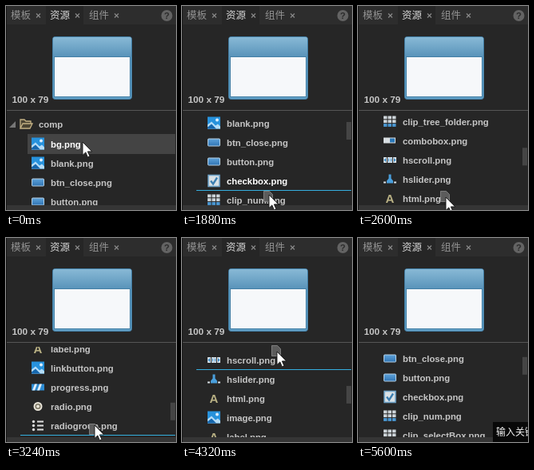
An HTML page for the animation above (5920 ms loop, 213 px wide and 255 px high).

```html
<!DOCTYPE html>
<html lang="zh-CN">
<head>
<meta charset="utf-8">
<style>
  html, body { margin: 0; width: 100%; height: 100%; overflow: hidden; background: #262626; }
  svg { display: block; width: 100vw; height: 100vh; }
  text { font: bold 11.35px "Liberation Sans", Arial, sans-serif; fill: #c6c6c6; }
  .tab { font: 12.5px "Noto Sans CJK SC", "Noto Sans CJK", sans-serif; fill: #929292; }
  .on { fill: #d8d8d8; }
  .letter { font-size: 15px; fill: #b9b184; }
  .active text:last-child { fill: #fff; }
  .bar { fill: none; }
  .lit .bar { fill: #444; }
</style>
</head>
<body>
<svg viewBox="0 0 213 255">
  <defs>
    <linearGradient id="title" x2="0" y2="1">
      <stop stop-color="#88b9d6"/><stop offset="1" stop-color="#5a94ba"/>
    </linearGradient>
    <linearGradient id="glossy" x2="0" y2="1">
      <stop stop-color="#5fa3da"/><stop offset="1" stop-color="#2f74b4"/>
    </linearGradient>
    <clipPath id="listArea"><rect y="136" width="213" height="113"/></clipPath>
  </defs>

  <rect width="213" height="255" fill="#262626"/>
  <rect width="213" height="23" fill="#2d2d2d"/>
  <rect x="50" width="47" height="23" fill="#262626"/>
  <g id="tabs"></g>
  <circle cx="201.500" cy="12" r="7" fill="#636363"/>
  <text x="201.500" y="16" text-anchor="middle" style="fill:#2d2d2d">?</text>

  <rect x="58.5" y="38.5" width="99" height="78" rx="3" fill="#62a0c6" stroke="#437fa6"/>
  <path d="M59 63v-22q0-2 2-2h94q2 0 2 2v22z" fill="url(#title)"/>
  <rect x="60.5" y="63.5" width="95" height="50" fill="#f6f8fa" stroke="#437fa6"/>
  <text x="7.500" y="121" style="font-size:11.8px">100 x 79</text>
  <path d="M0 130.500h213" stroke="#555"/>

  <g clip-path="url(#listArea)">
    <g id="list">
      <path d="M12 144v8h-8z" fill="#777"/>
      <path d="M18 153v-11h5l2 2h6v3M18 153l3-6h12l-3 6z" fill="#4b4432" stroke="#c3b184" stroke-width="1.300"/>
      <text x="41" y="152">comp</text>
    </g>
    <path id="dropLine" d="M18 0h194" stroke="#35aede"/>
    <rect id="thumb" x="206" width="6" height="22" fill="#454545"/>
  </g>
  <rect y="249" width="213" height="6" fill="#353535"/>
  <path d="M.5 0v255" stroke="#151515"/>

  <path id="page" d="M.5.5h7l4 4v9h-11z" fill="#5c5c5c" stroke="#969696" stroke-opacity=".7"/>
  <path id="cursor" d="M0 0v16.500l3.800-3.600 2.600 6 2.600-1.100-2.600-5.900h5.300z" fill="#fff" stroke="#111" stroke-width=".9"/>
  <g id="hint">
    <rect x="169" y="230" width="44" height="25" fill="#080808"/>
    <text class="tab" x="173" y="247" style="fill:#f2f2f2;font-size:12px">输入关键字</text>
  </g>
</svg>
<script>
const LOOP = 5920, TICK = 40, PITCH = 24, FIRST_ROW = 172;
const DRAG_OVER = 350, DRAG_OVER_PHASE = 90;
const $ = id => document.getElementById(id);
const rect = (x, y, w, h, fill, extra = '') =>
  `<rect x="${x}" y="${y}" width="${w}" height="${h}" fill="${fill}" ${extra}/>`;

// Icons are drawn around their own centre.
const icons = {
  picture: rect(-8, -8, 16, 15, '#2792dc') +
    '<circle cx="4" cy="-4" r="2" fill="#dcefff"/><path d="M-8 7v-5l5-4 5 5 3-2 3 3v3z" fill="#b4dcf8"/><path d="M-8 7v-2l5-4 6 6z" fill="#1667ad"/>',
  button: rect(-7.5, -4.5, 15, 9, 'url(#glossy)', 'rx="1" stroke="#b4cfe2"'),
  checkbox: rect(-7, -7, 14, 14, '#d9e1e6', 'stroke="#6fa3c8" stroke-width="1.6"') +
    '<path d="M-4 0l3 4 5-8" fill="none" stroke="#3c7fb2" stroke-width="2.4"/>',
  clip: [0, 1, 2].map(r => [0, 1, 2].map(c =>
    rect(c * 5.5 - 8, r * 4.8 - 7, 4.5, 3.8, r == 2 ? '#4a97d2' : '#ccd3d8')).join('')).join(''),
  combo: rect(-8, -4, 15, 7, '#d8dee2') + rect(0, -3, 6, 5, '#2a78b8'),
  scroll: [[-8, 4], [-3, 6], [4, 4]].map(([x, w]) => rect(x, -3.5, w, 7, '#d8e2e9')).join('') +
    '<path d="M-5-2.500v5l-2.500-2.500zM5-2.500v5l2.500-2.500zM-2-2h1v4h-1zM1-2h1v4h-1z" fill="#2b7fbd"/>',
  slider: rect(-8, 3, 3, 2, '#d5dde3') + rect(5, 3, 3, 2, '#d5dde3') +
    '<path d="M-1.500-6h3v5l2.500 3v3h-8v-3l2.500-3z" fill="#4a9fdc"/>',
  letter: '<text class="letter" x="0" y="5" text-anchor="middle">A</text>',
  progress: rect(-8, -4, 16, 8, '#2c8bd3') + '<path d="M-7 4l3-8h3l-3 8zM-1 4l3-8h3l-3 8z" fill="#e0edf6"/>',
  radio: '<circle r="4.500" fill="#77725f" stroke="#e8e4d8" stroke-width="2"/><circle r="2" fill="#e8e4d8"/>',
  group: [-5, 0, 5].map(y => `<circle cx="-5.500" cy="${y}" r="1.700" fill="#ddd"/>` + rect(-1, y - 1, 8, 2, '#ddd')).join('')
};

const files = `bg picture,blank picture,btn_close button,button button,checkbox checkbox,clip_num clip,
clip_selectBox clip,clip_tree_arrow clip,clip_tree_folder clip,combobox combo,hscroll scroll,hslider slider,
html letter,image picture,label letter,linkbutton picture,progress progress,radio radio,radiogroup group`
  .split(',').map(entry => entry.trim().split(' '));

$('tabs').innerHTML = ['模板', '资源', '组件'].map((name, i) => {
  const x = 6 + i * 49;
  return `<text class="tab ${i == 1 ? 'on' : ''}" x="${x}" y="16">${name}</text>
    <path d="M${x + 32} 9.500l5 5m0-5l-5 5" stroke="#888" stroke-width="1.200"/>`;
}).join('');

$('list').insertAdjacentHTML('beforeend', files.map(([name, icon], i) =>
  `<g class="row" transform="translate(0 ${FIRST_ROW + i * PITCH})">
    <rect class="bar" x="27" y="-12" width="185" height="25"/>
    <g transform="translate(40 .5)">${icons[icon]}</g><text x="56" y="5">${name}.png</text></g>`).join(''));
const rows = [...document.querySelectorAll('.row')];

// Each key: time, then values blended linearly.
const scrollKeys = [[0, 0], [1040, 0], [1120, 20], [1760, 20], [1880, 50], [2600, 220], [3240, 370],
  [3800, 370], [3840, 360], [4600, 200], [4800, 150], [5000, 100], [5120, 70]];
// Pointer x, y and the vertical offset of the dragged page.
const pointerKeys = [[0, 96, 170, -5], [520, 96, 170, -5], [1080, 109, 246, -5], [1520, 109, 246, -5],
  [1760, 109, 236, -5], [1880, 109, 236, -5], [2600, 110, 239, -8], [3240, 111, 234, -2],
  [3560, 119, 137, -12], [3840, 119, 137, -12], [4400, 119, 143, -7], [5040, 119, 143, -7], [5400, 214, 214, -7]];

function sample(keys, t) {
  const next = keys.findIndex(k => k[0] > t);
  if (next < 0) return keys.at(-1).slice(1);
  const a = keys[next - 1], b = keys[next], f = (t - a[0]) / (b[0] - a[0]);
  return a.slice(1).map((v, i) => v + (b[i + 1] - v) * f);
}
const scrollAt = t => Math.round(sample(scrollKeys, t)[0] / 10) * 10;
const rowUnderPointer = t =>
  Math.floor((sample(pointerKeys, t)[1] + scrollAt(t) - FIRST_ROW + 12) / PITCH);
const move = (id, x, y) => $(id).setAttribute('transform', `translate(${x} ${y})`);
const show = (id, visible) => $(id).style.display = visible ? '' : 'none';

function draw(time) {
  const t = Math.floor(time / TICK) * TICK;
  const scroll = scrollAt(t), [x, y, pageOffset] = sample(pointerKeys, t);
  const dragging = t >= 600 && t < 5000;

  move('list', 0, -scroll);
  move('thumb', 0, 135.5 + scroll * .19);
  show('thumb', scroll > 0);
  move('cursor', Math.round(x), Math.round(y));
  show('cursor', t < 5400);
  move('page', Math.round(x) - 7, Math.round(y + pageOffset));
  show('page', dragging);
  show('hint', t >= 5600);

  // The drop marker is placed at each drag-over tick and rides along with the list in between.
  if (dragging) {
    const lastTick = Math.floor((t - DRAG_OVER_PHASE) / DRAG_OVER) * DRAG_OVER + DRAG_OVER_PHASE;
    move('dropLine', 0, FIRST_ROW + rowUnderPointer(lastTick) * PITCH + 12.5 - scroll);
  }
  show('dropLine', dragging);

  const hovered = dragging ? (t >= 1120 ? 4 : 0) : t < 5400 ? rowUnderPointer(t) : -1;
  rows.forEach((row, i) => {
    row.classList.toggle('active', i == 0 || i == hovered);
    row.classList.toggle('lit', i == 0 || (!dragging && i == hovered));
  });
}

const start = performance.now();
(function frame() {
  draw((performance.now() - start) % LOOP);
  requestAnimationFrame(frame);
})();
</script>
</body>
</html>
```
